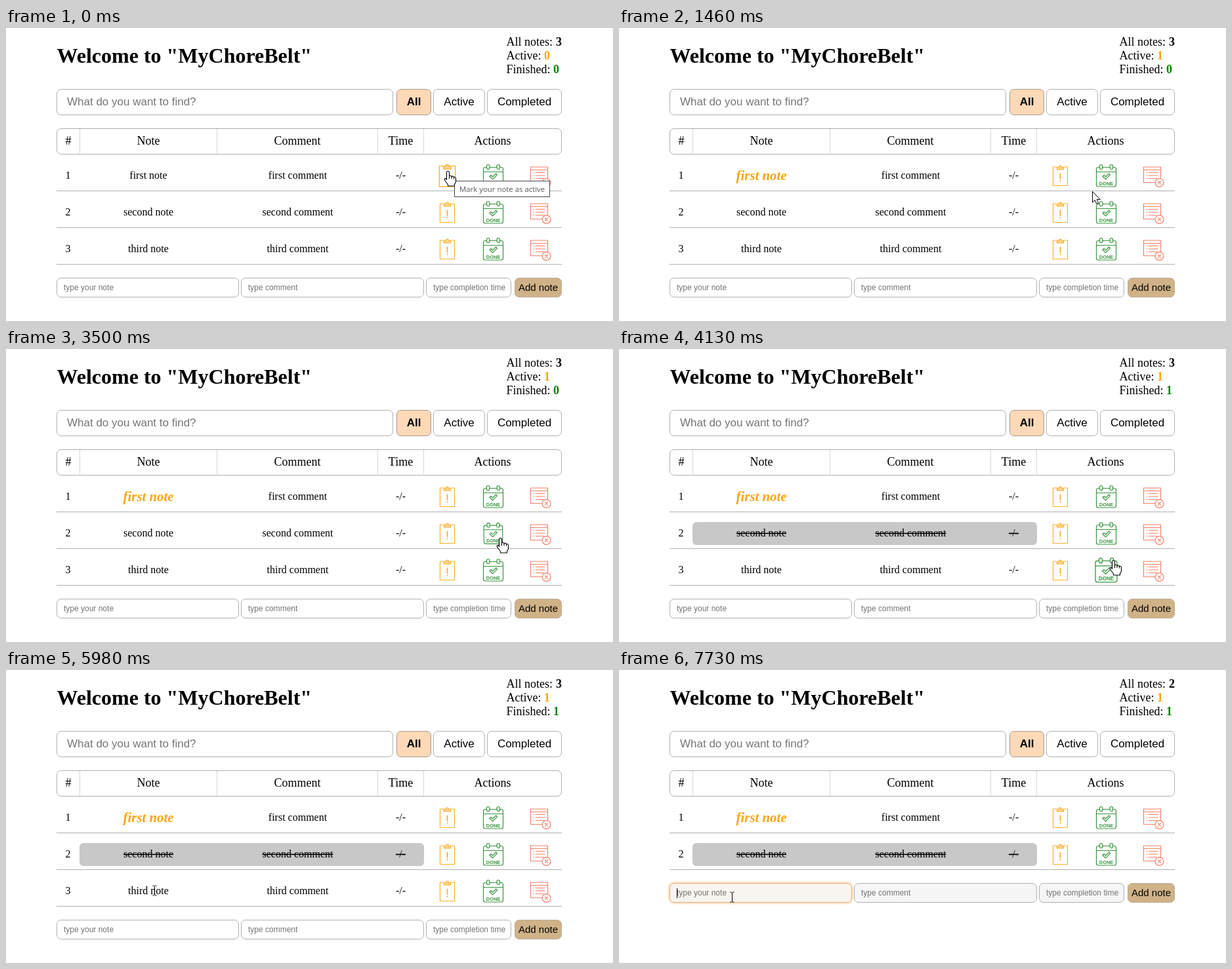
Write an HTML page that moves like this. It is 925 px wide and 447 px high and loops after 8000 ms.

```html
<!DOCTYPE html>
<html lang="en">
<head>
<meta charset="utf-8">
<title>Checklist</title>
<style>
  html, body { margin: 0; width: 100%; height: 100%; overflow: hidden; background: #fff; }
  svg { display: block; width: 925px; height: 447px; }
  text { font-family: "Liberation Serif", "Times New Roman", serif; font-size: 16px; white-space: pre; }
  .mid { text-anchor: middle; }
  .head { font-size: 18px; }
  .ui { font-family: "Liberation Sans", Arial, sans-serif; font-size: 17px; }
  .hint { font-size: 12px; fill: #757575; }
  .tip { font-family: "Open Sans", "Noto Sans", sans-serif; font-size: 11.4px; fill: #575757; }
  .box { fill: #fff; stroke: #b0b0b0; }
  .rule { stroke: #b0b0b0; }
  .icon { fill: none; stroke-width: 1.2; stroke-linejoin: round; stroke-linecap: round; }
  .active { font-size: 20.8px; font-weight: bold; font-style: italic; fill: #fda50f; }
  .done { text-decoration: line-through; }
</style>
</head>
<body>
<svg id="stage" viewBox="0 0 925 447"></svg>
<script>
const LOOP = 8000;
const ROW_STEP = 56;
const ACTIVATED = 910, FINISHED = 3590, REMOVED = 6890;

// Bursts of visible change: first time, last time, number of steps.
const BURSTS = [
  [0, 0, 1], [830, 1610, 10], [1700, 1700, 1], [2300, 2300, 1], [3500, 3600, 2],
  [3770, 4550, 10], [4640, 5430, 10], [5520, 5610, 2], [5980, 6540, 8],
  [6810, 7490, 9], [7640, 7730, 2]
];
const TICKS = BURSTS.flatMap(([from, to, n]) =>
  Array.from({ length: n }, (_, i) => from + (n > 1 ? i * (to - from) / (n - 1) : 0)));

// Pointer path: time, x, y.
const PATH = [
  [0, 673, 218], [1003, 673, 218], [1437, 721, 249], [1610, 742, 277], [1700, 753, 288],
  [3600, 753, 288], [3770, 757, 300], [4117, 753, 322], [4290, 806, 340], [4463, 762, 346],
  [4550, 743, 347], [4640, 725, 351], [4900, 560, 360], [5260, 300, 345], [5430, 219, 337],
  [5520, 221, 337], [5610, 223, 337], [5980, 226, 336], [6220, 480, 356], [6540, 822, 338],
  [7065, 822, 338], [7235, 600, 344], [7400, 230, 346], [7490, 172, 346]
];
// Tooltips: from, to, left, top, width, text.
const TIPS = [
  [0, 830, 683.5, 233.5, 145, "Mark your note as active"],
  [2300, 3500, 763.5, 302.5, 172, "Mark your note as completed"]
];
const PRESSES = [[830, 910], [3500, 3590], [6810, 6890]];

const text = (x, y, cls, str, extra = "") => `<text x="${x}" y="${y}" class="${cls}" ${extra}>${str}</text>`;
const box = (x, y, w, h, extra = "") =>
  `<rect x="${x + .5}" y="${y + .5}" width="${w - 1}" height="${h - 1}" rx="6.5" class="box" ${extra}/>`;
const line = (x1, y1, x2, y2, extra = "") =>
  `<path d="M${x1} ${y1}L${x2} ${y2}" class="rule" ${extra}/>`;

// Icons are drawn around their own centre; half sizes serve for hit tests.
const ICONS = [
  { x: 672.5, dy: .5, hw: 12, hh: 16, art: `<g class="icon" stroke="#fdb02f">
      <path d="M-5-13.5H-11V15H11V-13.5H5"/><path d="M-5-9.5V-13H-2.5Q-2-15.5 0-15.5T2.5-13H5V-9.5Z" fill="#fdd58c"/>
      <path d="M0-3V4.5M0 7.6V8" stroke-width="1.9"/></g>` },
  { x: 742.5, dy: .5, hw: 16, hh: 18, art: `<g class="icon" stroke="#3a9640">
      <path d="M-10-13H-12.5Q-15-13-15-10V13.5Q-15 16.5-12 16.5H12Q15 16.5 15 13.5V-10Q15-13 12.5-13H10M-5.5-13H5.5M-15-6H15"/>
      <rect x="-10" y="-17" width="4.5" height="7" rx="2.2"/><rect x="5.5" y="-17" width="4.5" height="7" rx="2.2"/>
      <path d="M-5.5 1L-3.5-1-.8 1.5 4.2-3.5 6-1.6-.8 5.3Z"/></g>
      <text y="14" class="ui mid" style="font-size:7.4px;font-weight:bold;fill:#3a9640">DONE</text>` },
  { x: 814.5, dy: 2, hw: 16, hh: 16, art: `<g class="icon" stroke="#f8806c">
      <path d="M8 8.5H-15V-15H11V3M-15-10.5H11"/>
      <path d="M-10.5-6.5H-9.5M-7-6.5H6.5M-10.5-2H-9.5M-7-2H6.5M-10.5 2.5H-9.5M-7 2.5H5"/>
      <circle cx="9" cy="9" r="6.4" fill="#fff"/><path d="M7 7L11 11M11 7L7 11"/></g>` }
];

const row = (name, i) => {
  const y = 230 + i * ROW_STEP;
  const icons = ICONS.map((icon, k) => `<g id="icon${i}${k}">${icon.art}</g>`).join("");
  return `<g id="row${i}">
    ${i === 1 ? `<rect id="shade" x="112" y="264" width="525" height="35" rx="6" fill="#c8c8c8"/>` : ""}
    ${text(94.5, y, "mid", i + 1)}
    ${text(217, y, "mid", name + " note", `id="note${i}"`)}
    ${text(444.5, y, "mid cell" + i, name + " comment")}
    ${text(601.5, y, "mid cell" + i, "-/-")}
    ${icons}${line(77, y + 18.5, 847, y + 18.5)}</g>`;
};

const counter = (y, label, x, color, id) =>
  text(762.5, y, "head", label) + text(x, y, "head", "0", `id="${id}" font-weight="bold" fill="${color}"`);

const columns = [["#", 95], ["Note", 217], ["Comment", 444], ["Time", 601.5], ["Actions", 741.5]];

document.getElementById("stage").innerHTML = `
  ${text(77.5, 53, "", 'Welcome to "MyChoreBelt"', 'style="font-size:32px;font-weight:bold"')}
  ${counter(27, "All notes:", 838, "#000", "total")}
  ${counter(48, "Active:", 820, "#fda50f", "activeCount")}
  ${counter(69, "Finished:", 834, "#0a800a", "finishedCount")}
  ${box(77, 93, 513, 40)}${text(93, 118, "ui", "What do you want to find?", 'fill="#757575"')}
  ${box(595, 93, 53, 40, 'style="fill:#fdd9b7;stroke:#aa9a8c"')}${text(621.5, 118, "ui mid", "All", 'font-weight="bold"')}
  ${box(651, 93, 79, 40)}${text(690.5, 118, "ui mid", "Active")}
  ${box(733, 93, 114, 40)}${text(790, 118, "ui mid", "Completed")}
  ${box(77, 153, 770, 40)}
  ${[112.5, 321.5, 566.5, 636.5].map(x => line(x, 154, x, 192, 'stroke-dasharray="1 1"')).join("")}
  ${columns.map(([label, x]) => text(x, 178, "mid head", label)).join("")}
  ${["first", "second", "third"].map(row).join("")}
  <g id="form">
    ${box(77, 381, 278, 30, 'id="noteInput"')}
    ${box(358, 381, 279, 30, 'data-tint=""')}${box(640, 381, 130, 30, 'data-tint=""')}
    ${text(88, 400, "ui hint", "type your note")}
    ${text(369, 400, "ui hint", "type comment")}
    ${text(651, 400, "ui hint", "type completion time")}
    ${box(775, 381, 72, 30, 'style="fill:#d0b288;stroke:#bcae98"')}
    ${text(811, 401, "ui mid", "Add note", 'style="font-size:15px"')}
    <path id="caret" d="M88.5 389V404" stroke="#000"/>
  </g>
  ${TIPS.map(([, , x, y, w, str], i) => `<g id="tip${i}">
    <rect x="${x}" y="${y}" width="${w}" height="24" fill="#fff" stroke="#4a4a4a"/>
    ${text(x + 7.5, y + 16.5, "tip", str)}</g>`).join("")}
  <g id="pointer" fill="#fff" stroke="#000" stroke-linejoin="round">
    <path id="arrow" d="M0 0V16.5L3.8 13 6.5 19 9.2 17.8 6.6 12H11.8Z"/>
    <g id="hand" stroke-width="1.1">
      <path d="M-2 2Q-2 0 0 0T2 2V8Q2 6.6 3.7 6.8T5.5 8.4Q6 7.4 7.5 7.7T9 9.5Q9.5 8.6 10.7 9T12 11V15Q12 18 10 20V22.5H0V20.5L-5 13.5Q-6 11.5-4.6 11T-2 13Z"/>
      <path d="M2 8V11.5M5.5 8.5V11.5M9 9.5V12" fill="none"/></g>
    <path id="ibeam" fill="none" d="M-3-7.5H-1.2L0-6.5 1.2-7.5H3M0-6.5V6.5M-3 7.5H-1.2L0 6.5 1.2 7.5H3"/>
  </g>`;

const el = Object.fromEntries([...document.querySelectorAll("[id]")].map(e => [e.id, e]));
const tinted = document.querySelectorAll("[data-tint]");
const secondCells = document.querySelectorAll(".cell1");

const show = (node, on) => { node.style.display = on ? "" : "none"; };
const ramp = (t, from, to) => Math.min(1, Math.max(0, (t - from) / (to - from)));
const within = (t, [from, to]) => t >= from && t < to;
const near = (x, y, cx, cy, w, h) => Math.abs(x - cx) <= w && Math.abs(y - cy) <= h;
const blend = (from, to, k) => `rgb(${from.map((c, i) => c + (to[i] - c) * k)})`;

function pointerAt(t) {
  const i = PATH.findIndex(p => p[0] > t);
  if (i < 0) return PATH[PATH.length - 1].slice(1);
  const [a, b] = [PATH[i - 1], PATH[i]];
  const k = ramp(t, a[0], b[0]);
  return [a[1] + (b[1] - a[1]) * k, a[2] + (b[2] - a[2]) * k];
}

function pointerKind(x, y, rows, overIcon, formY) {
  if (overIcon) return "hand";
  if (near(x, y, 462, formY, 308, 15)) return x < 770 ? "ibeam" : "hand";
  if (near(x, y, 811, formY, 36, 15)) return "hand";
  for (let i = 0; i < rows; i++) {
    const cy = 225 + i * ROW_STEP;
    if (near(x, y, 217, cy, 34, 12) || near(x, y, 444, cy, 50, 12)) return "ibeam";
  }
  return "arrow";
}

function render(now) {
  const t = TICKS.findLast(tick => tick <= now + .01);
  const [x, y] = pointerAt(t);
  const removed = t >= REMOVED;
  const rows = removed ? 2 : 3;
  const pressed = PRESSES.some(p => within(t, p));
  let overIcon = false;

  for (let i = 0; i < 3; i++) {
    ICONS.forEach((icon, k) => {
      const cy = 225 + icon.dy + i * ROW_STEP;
      const over = i < rows && near(x, y, icon.x, cy, icon.hw, icon.hh);
      overIcon = overIcon || over;
      const scale = over ? (pressed ? .95 : 1.1) : 1;
      el["icon" + i + k].setAttribute("transform", `translate(${icon.x} ${cy}) scale(${scale})`);
    });
  }

  const active = t >= ACTIVATED, finished = t >= FINISHED;
  el.total.textContent = rows;
  el.activeCount.textContent = +active;
  el.finishedCount.textContent = +finished;
  el.note0.setAttribute("class", active ? "mid active" : "mid");
  el.note0.setAttribute("y", active ? 232 : 230);
  [el.note1, ...secondCells].forEach(e => e.classList.toggle("done", finished));
  el.shade.style.opacity = ramp(t, 3600, 4030);
  show(el.row2, !removed);

  el.form.setAttribute("transform", `translate(0 ${removed ? -ROW_STEP : 0})`);
  const tint = ramp(t, 6895, 7320);
  const focus = ramp(t, 7550, 7730);
  const gray = [255, 255, 255].map(c => c - 10 * tint);
  tinted.forEach(e => { e.style.fill = `rgb(${gray})`; });
  el.noteInput.style.fill = blend(gray, [248, 244, 239], focus);
  el.noteInput.style.stroke = blend([176, 176, 176], [232, 178, 128], focus);
  el.noteInput.style.filter = focus ? `drop-shadow(0 0 2px rgba(250,170,95,${focus}))` : "";
  show(el.caret, focus > 0);

  TIPS.forEach((tip, i) => show(el["tip" + i], within(t, tip)));
  const kind = pointerKind(x, y, rows, overIcon, removed ? 340 : 396);
  for (const name of ["arrow", "hand", "ibeam"]) show(el[name], name === kind);
  el.pointer.setAttribute("transform", `translate(${Math.round(x) + .5} ${Math.round(y) + .5})`);
}

function frame() {
  render(performance.now() % LOOP);
  requestAnimationFrame(frame);
}
frame();
</script>
</body>
</html>
```
